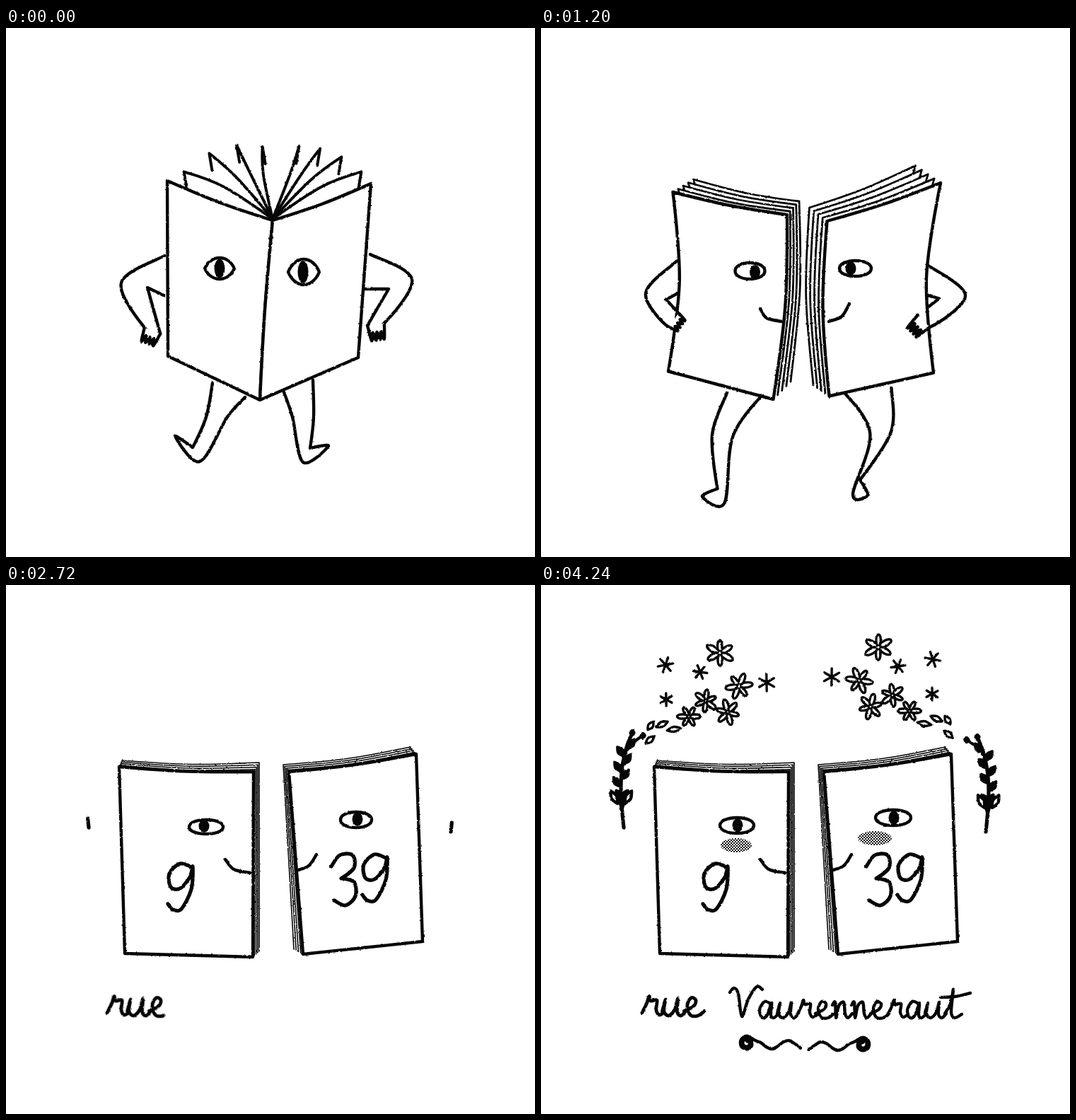
Animation, 748 px wide and 748 px high, one loop 4400 ms. Source, as an HTML page:

```html
<!DOCTYPE html>
<html lang="fr">
<head>
<meta charset="utf-8">
<title>Book walk</title>
<style>
html, body { margin: 0; width: 100%; height: 100%; overflow: hidden; background: #fff; }
svg { display: block; width: 100vw; height: 100vh; }
path { fill: none; stroke: #060606; stroke-width: 4.4; stroke-linecap: round; stroke-linejoin: round; }
.paper { fill: #fff; }
.ink { fill: #060606; }
.thin { stroke-width: 3.4; }
</style>
</head>
<body>
<svg viewBox="0 0 748 748">
  <defs>
    <filter id="rough" filterUnits="userSpaceOnUse" x="0" y="0" width="748" height="748" color-interpolation-filters="sRGB">
      <feTurbulence id="noise" type="fractalNoise" baseFrequency=".3" numOctaves="1" seed="1"/>
      <feDisplacementMap in="SourceGraphic" scale="2.6" xChannelSelector="R" yChannelSelector="G"/>
    </filter>
    <pattern id="dots" width="4" height="4" patternUnits="userSpaceOnUse">
      <path d="M0 0h2v2h-2zM2 2h2v2h-2z" style="stroke:none;fill:#111"/>
    </pattern>
  </defs>
  <g id="ink" filter="url(#rough)"></g>
  <g id="blush" fill="url(#dots)"></g>
</svg>
<script>
const LOOP = 4400;
const POSE_TIMES = [400, 880, 1520, 2000, 2560];
const LIMBS_GONE = 2320;
const root = document.getElementById('ink');
const noise = document.getElementById('noise');
const parts = [];

// geometry
const parse = text => text.split(' ').map(p => p.split(',').map(Number));
const range = (n, make) => Array.from({ length: n }, (_, i) => make(i));
const clamp = u => Math.max(0, Math.min(1, u));
const lerp = (a, b, u) => [a[0] + (b[0] - a[0]) * u, a[1] + (b[1] - a[1]) * u];
const shift = (p, x, y) => [p[0] + x, p[1] + y];
const polar = (c, r, a) => [c[0] + Math.cos(a) * r, c[1] + Math.sin(a) * r];
const corner = p => [p[0], p[1], true];
const ramp = (t, from, to) => clamp((t - from) / (to - from));

// smooth line through points, sharp at corners
function curve(p) {
  const at = i => p[Math.max(0, Math.min(p.length - 1, i))];
  const reach = (i, sign) => {
    if (at(i)[2]) return at(i).slice(0, 2);
    return shift(at(i), sign * (at(i + 1)[0] - at(i - 1)[0]) / 6, sign * (at(i + 1)[1] - at(i - 1)[1]) / 6);
  };
  return 'M' + at(0).slice(0, 2) + range(p.length - 1, i =>
    `C${reach(i, 1)} ${reach(i + 1, -1)} ${at(i + 1).slice(0, 2)}`).join('');
}

// a list of poses becomes a function of time
function track(poses, times = POSE_TIMES) {
  const list = poses.map(parse);
  return t => {
    let i = 0;
    while (i < list.length - 2 && t >= times[i + 1]) i++;
    const u = ramp(t, times[i], times[i + 1]);
    return list[i].map((p, k) => lerp(p, list[i + 1][k], u));
  };
}

// drawing
function add(tag, attrs, parent = root) {
  const node = document.createElementNS('http://www.w3.org/2000/svg', tag);
  set(node, attrs);
  return parent.appendChild(node);
}
function set(node, attrs) {
  for (const k in attrs) node.setAttribute(k, attrs[k]);
}
function during(node, from, to, update) {
  parts.push(t => {
    const on = t >= from && t < to;
    node.style.display = on ? '' : 'none';
    if (on && update) update(t);
  });
}
function shape(points, cls = 'paper', from = 0, to = LOOP) {
  const node = add('path', { class: cls });
  during(node, from, to, t => node.setAttribute('d', curve(points(t))));
  return node;
}
function pen(points, from, length, parent = root, attrs = {}) {
  const node = add('path', { d: curve(points), pathLength: 1, ...attrs }, parent);
  during(node, from, LOOP, t =>
    node.setAttribute('stroke-dasharray', `${clamp((t - from + 30) / length)} 2`));
}

// legs: front hip, back hip, knee, ankle, toe
function leg(poses) {
  const joints = track(poses);
  shape(t => {
    const [a, b, knee, ankle, toe] = joints(t);
    const phase = t < 1520 ? ramp(t, 880, 1520) : ramp(t, 1520, 2000);
    const drop = 40 * Math.sin(Math.PI * phase);
    const side = Math.sign(a[0] - b[0]);
    const hip = lerp(a, b, .5);
    return [a, shift(knee, 15 * side, drop / 2), corner(shift(ankle, 6 * side, drop - 12)),
      shift(toe, 0, drop), shift(ankle, -4 * side, drop + 8), shift(knee, -15 * side, drop / 2), b]
      .map(p => [...lerp(p, hip, ramp(t, 2000, 2400)), p[2]]);
  }, 'paper', 0, LIMBS_GONE);
}
leg(['292,502 338,522 298,550 270,605 239,577', '292,512 363,487 270,543 268,609 236,592',
  '234,520 281,530 244,568 243,638 220,653', '205,524 256,526 195,548 196,601 166,580']);
leg(['434,498 393,515 420,550 424,606 456,591', '478,510 363,487 469,540 418,588 421,603',
  '513,508 469,515 491,562 472,634 503,638', '570,506 512,510 574,538 575,576 608,560']);

// arms: shoulder, armpit, outer elbow, inner elbow, wrist, fingertips
function arm(poses, side) {
  const pose = track(poses);
  const joints = t => {
    const p = pose(t);
    return p.map(q => lerp(q, p[0], ramp(t, 2000, 2400)));
  };
  const across = (wrist, tips, u) => {
    const dx = tips[0] - wrist[0], dy = tips[1] - wrist[1], n = Math.hypot(dx, dy) || 1;
    return [-dy / n * u * side, dx / n * u * side];
  };
  shape(t => {
    const [shoulder, pit, elbow, inner, wrist, tips] = joints(t);
    return [shoulder, elbow, shift(wrist, ...across(wrist, tips, 12)),
      corner(shift(wrist, ...across(wrist, tips, -12))), corner(inner), pit];
  }, 'paper', 0, LIMBS_GONE);
  return () => shape(t => {
    const [, , , , wrist, tips] = joints(t);
    return range(9, i => {
      const spread = across(wrist, tips, 12 - 3 * i);
      return shift(lerp(wrist, tips, i % 8 ? (i % 2 ? 1 : .5) : 0), ...spread);
    });
  }, 'paper', 0, LIMBS_GONE);
}
const hands = [
  arm(['224,322 223,378 163,360 200,367 207,428 200,446', '214,319 221,361 156,370 190,368 215,396 241,393',
    '170,340 177,383 140,380 164,400 160,430 156,449', '156,347 160,396 120,395 150,407 116,440 111,474'], 1),
  arm(['515,320 504,369 574,355 541,369 523,419 526,441', '516,320 508,369 582,370 538,377 518,409 501,428',
    '568,345 566,381 618,385 588,388 564,420 548,433', '585,332 587,396 622,396 597,405 627,432 636,463'], -1)
];

// half a book: outer top, inner top, inner bottom, outer bottom,
// then the depth of the pages at outer top, inner top and inner bottom, and the bow of both sides
const SPINE = [377, 270];
function half(poses, side, fanStep, fanShrink) {
  const pose = track(poses);
  for (let i = 3; i >= 0; i--) {
    const u = (i + 1) / 4;
    const angle = (28 + fanStep * i) * Math.PI / 180;
    const fanTip = shift(SPINE, side * Math.cos(angle) * (142 - fanShrink * i), -Math.sin(angle) * (142 - fanShrink * i));
    const fan = [shift(fanTip, -4 * side, 24), fanTip, shift(lerp(fanTip, SPINE, .5), 6 * side, -12), SPINE, SPINE, SPINE];
    const node = shape(t => {
      const [a, b, c, , da, db, dc, bow] = pose(t);
      const [tip, top, foot] = [[a, da], [b, db], [c, dc]].map(([p, d]) => shift(p, d[0] * u, d[1] * u));
      const sheet = [shift(tip, -4 * side, 14), tip, shift(lerp(tip, top, .5), 0, 4), top,
        shift(lerp(top, foot, .5), -side * bow[1], 0), foot];
      const open = ramp(t, 400, 800);
      return fan.map((p, k) => {
        const q = lerp(p, sheet[k], open);
        return k === 1 || k === 3 ? corner(q) : q;
      });
    });
    parts.push(t => node.style.strokeWidth = 4 - 2.4 * ramp(t, 880, 1520));
  }
  return () => shape(t => {
    const [a, b, c, d, , , , bow] = pose(t);
    return [corner(a), shift(lerp(a, b, .5), 0, 3), corner(b), shift(lerp(b, c, .5), -side * bow[1], 0),
      corner(c), lerp(c, d, .5), corner(d), shift(lerp(d, a, .5), -side * bow[0], 0), corner(a)];
  });
}
const covers = [
  half(['228,216 377,272 359,526 229,464 0,0 0,0 0,0 0,-2', '201,223 354,258 321,517 181,464 35,-24 12,-31 25,-25 25,14',
    '172,241 342,270 336,533 179,507 23,-12 22,-7 24,-25 0,0', '160,254 350,261 350,523 168,523 6,-8 6,-7 12,-10 0,0',
    '160,257 350,264 349,526 168,521 4,-9 8,-13 9,-8 0,0'], -1, 18, 13),
  half(['516,220 377,272 359,526 498,466 0,0 0,0 0,0 0,2', '555,218 402,272 405,518 540,487 -52,-40 -28,-34 -24,-20 30,15',
    '575,220 407,274 410,523 570,488 -19,-9 -22,-4 -21,-11 0,0', '579,231 403,264 414,519 585,500 -19,-14 -12,-8 -12,-7 0,0',
    '580,239 400,264 420,522 589,504 -8,-10 -8,-10 -13,-7 0,0'], 1, 14, 11)
];
covers.forEach(draw => draw());
hands.forEach(draw => draw());

// eyes: centre, radii, pupil
function eye(poses) {
  const pose = track(poses, [400, 880, 1520, 2000, 2720, 3360]);
  const lid = add('path', { class: 'paper' });
  const pupil = add('ellipse', { class: 'ink' });
  parts.push(t => {
    const [[x, y], [rx, ry], [px, py]] = pose(t);
    const h = ry * 4 / 3, k = rx * (1 - .45 * (1 - ramp(t, 400, 880)));
    lid.setAttribute('d', `M${x - rx} ${y}C${x - k} ${y - h} ${x + k} ${y - h} ${x + rx} ${y}`
      + `C${x + k} ${y + h} ${x - k} ${y + h} ${x - rx} ${y}Z`);
    set(pupil, { cx: px, cy: py, rx: 7.5, ry: ry * .88 });
  });
}
eye(['302,340 21,15 302,340', '305,344 21,12 306,345', '286,343 21,11 299,345',
  '285,343 24,10 300,343', '283,342 24,10 280,341', '277,340 24,11 278,340']);
eye(['421,345 22,18 420,345', '421,342 24,11 419,340', '468,338 21,11 457,340',
  '492,335 23,11 478,336', '495,332 22,11 497,331', '498,329 25,11 499,329']);

// mouths and cheeks
const SMILE_TIMES = POSE_TIMES.slice(2);
shape(track(['310,397 319,410 340,415', '308,385 322,405 348,414', '310,388 322,402 345,407'], SMILE_TIMES), '', 1200);
shape(track(['407,415 425,408 436,390', '410,413 432,406 445,378', '410,404 428,397 439,381'], SMILE_TIMES), '', 1200);
['292,385 303,388 315,382 318,375', '432,370 447,376 463,374'].forEach(s => shape(() => parse(s), 'thin', 1840, 2320));

// house numbers
const nine = parse('262,399 246,394 231,408 233,427 246,429 260,413 264,398 262,430 248,458 236,459 229,451');
const three = parse('460,398 472,382 490,382 492,400 474,415 492,420 494,440 480,453 464,446');
const bold = { style: 'stroke-width:5.2' };
pen(nine, 1760, 280, root, bold);
pen(three.map((p, i) => i === 4 ? corner(p) : p), 1760, 280, root, bold);
pen(nine.map(p => shift(p, 275, -13)), 1800, 240, root, bold);

// flick marks flying away from the hands
function flick(hand, radius, step) {
  range(4, i => shape(t => {
    const a = (85 + step * i) * Math.PI / 180, r = radius * (.8 + (t - 1840) / 800);
    return [polar(hand, r - 6, a), polar(hand, r + 7, a)];
  }, '', 1840, 2320));
}
flick([118, 455], 84, 35);
flick([628, 450], 62, -32);

// ornaments that pop up in place
function pop(parent, d, [x, y], from, turn, cls) {
  const node = add('path', { d, class: cls, 'vector-effect': 'non-scaling-stroke' }, parent);
  during(node, from, LOOP, t => node.setAttribute('transform',
    `translate(${x} ${y}) rotate(${turn}) scale(${clamp((t - from) / 160 + .4)})`));
}
const leaf = (r, w) => curve([corner([0, r]), [w, 0], corner([0, -r]), [-w, 0], corner([0, r])]);

// twigs
const stem = u => [117 - 14 * u + 26 * u ** 3, 343 - 134 * u];
const climb = u => 2690 + 620 * u;
function twig(transform) {
  const g = add('g', { transform });
  pen(range(9, i => stem(i / 8)), 2690, 640, g, bold);
  pen([stem(.8), shift(stem(.92), 10, 0), shift(stem(.97), 17, 0)], climb(.85), 100, g);
  pop(g, 'M-8 -12L0 -8L8 -12L0 14Z', shift(stem(.3), 1, 0), climb(.3), 0, 'ink');
  [-1, 1].forEach(s => pop(g, leaf(10, 4), shift(stem(.32), 10 * s, 0), climb(.32), 28 * s, 'paper'));
  range(6, i => {
    const u = .46 + .08 * i, s = i % 2 ? 1 : -1;
    pop(g, leaf(8, 4), shift(stem(u), 6 * s, -3), climb(u), 35 * s, 'ink thin');
  });
  [stem(1), shift(stem(.97), 17, 0)].forEach(p => pop(g, leaf(3, 2.5), p, climb(1), 0, 'ink'));
}
twig('');
twig('translate(746 6) scale(-1 1)');

// blossoms: petals, stars and loose leaves, the right spray mirrors the left
function flower(r, turn) {
  const at = (k, a) => polar([0, 0], r * k, a + turn);
  const rim = range(49, i => {
    const a = i / 48 * 2 * Math.PI;
    return at(.7 + .32 * Math.cos(6 * a) + .08 * Math.cos(2 * a + turn), a);
  });
  const slits = range(6, i => curve([at(.4, (i + .5) * Math.PI / 3), at(.16, (i + .5) * Math.PI / 3)]));
  return curve(rim) + slits.join('');
}
const star = (r, turn) => range(3, i =>
  curve([0, Math.PI].map(half => polar([0, 0], r, turn + half + i * Math.PI / 3)))).join('');
const spray = [
  ['155,199 154,219 171,197 188,204', 3400, i => [leaf(7 + i, 3.5), 35 + 15 * i]],
  ['209,186 233,164 264,180 280,143 253,96', 3560, i => [flower(15 + i, i * 1.7), 0]],
  ['177,162 225,123 176,113 319,138', 3600, i => [star(9 + i, i * .7 + .5), 0]]
];
['', 'translate(730 -8) scale(-1 1)'].forEach(transform => {
  const g = add('g', { transform });
  spray.forEach(([places, from, make]) => parse(places).forEach((p, i) => {
    const [d, turn] = make(i);
    pop(g, d, p, from + i * 90, turn, 'paper thin');
  }));
});

// handwriting: advance width, then strokes on a zero baseline
const glyphs = {
  r: [26, '0,-4 6,-16 9,-25 11,-19 19,-20 18,-8 22,-1 28,-4'],
  u: [28, '0,-6 4,-21 2,-6 8,0 16,-8 20,-22 19,-5 24,0 30,-6'],
  e: [24, '0,-6 12,-12 15,-20 9,-23 4,-13 8,-1 18,0 26,-6'],
  V: [40, '0,-36 6,-42 12,-34 17,-2 26,-26 38,-44 46,-40'],
  a: [27, '18,-20 9,-23 2,-11 6,0 13,-4 19,-21 18,-4 22,0 29,-6'],
  n: [27, '0,-18 4,-22 5,0 9,-17 16,-22 18,-6 22,0 28,-6'],
  t: [24, '0,-6 8,-20 12,-40 9,-8 14,0 24,-5', '-6,-29 14,-30 36,-35']
};
function write(word, x, y, size, from, gap) {
  const g = add('g', { transform: `translate(${x} ${y}) scale(${size})`, role: 'img', 'aria-label': word });
  let left = 0;
  [...word].forEach((letter, i) => {
    const [width, ...strokes] = glyphs[letter];
    strokes.forEach(s => pen(parse(s), from + i * gap, 80, g, { transform: `translate(${left} 0)` }));
    left += width;
  });
}
write('rue', 143, 609, 1.1, 2520, 80);
write('Vaurenneraut', 267, 612, 1, 2740, 75);

// flourish: a spiral that runs out into a wave
const scroll = [
  ...range(13, i => polar([291, 648], 3 + i * .6, (i / 3 - 2.5) * Math.PI / 1)),
  ...range(9, i => [303 + i * 8, 650 - 6 * Math.cos(i * 8 / 46 * 2 * Math.PI)])
];
['', 'translate(746 2) scale(-1 1)'].forEach(transform => pen(scroll, 3520, 240, root, { transform }));

// blush
[[276, 368, 22], [472, 358, 24]].forEach(([cx, cy, width]) => {
  const node = add('ellipse', { cx, cy }, document.getElementById('blush'));
  during(node, 3280, LOOP, t => {
    const grown = .3 + .7 * ramp(t, 3360, 3760);
    set(node, { rx: width * grown, ry: 10 * grown });
  });
});

// drawings are held on eighty-millisecond steps, some twice as long
function hold(t) {
  if (t < 80) return 0;
  if (t < 400) return t < 240 ? 80 : 240;
  return t >= 4240 ? 4240 : Math.min(4080, Math.floor(t / 80) * 80);
}
const start = performance.now();
let shown = -1;
function frame() {
  const t = hold((performance.now() - start) % LOOP);
  if (t !== shown) {
    shown = t;
    noise.setAttribute('seed', t < 2560 ? 1 + t / 80 : 33);
    parts.forEach(update => update(t));
  }
  requestAnimationFrame(frame);
}
frame();
</script>
</body>
</html>
```
